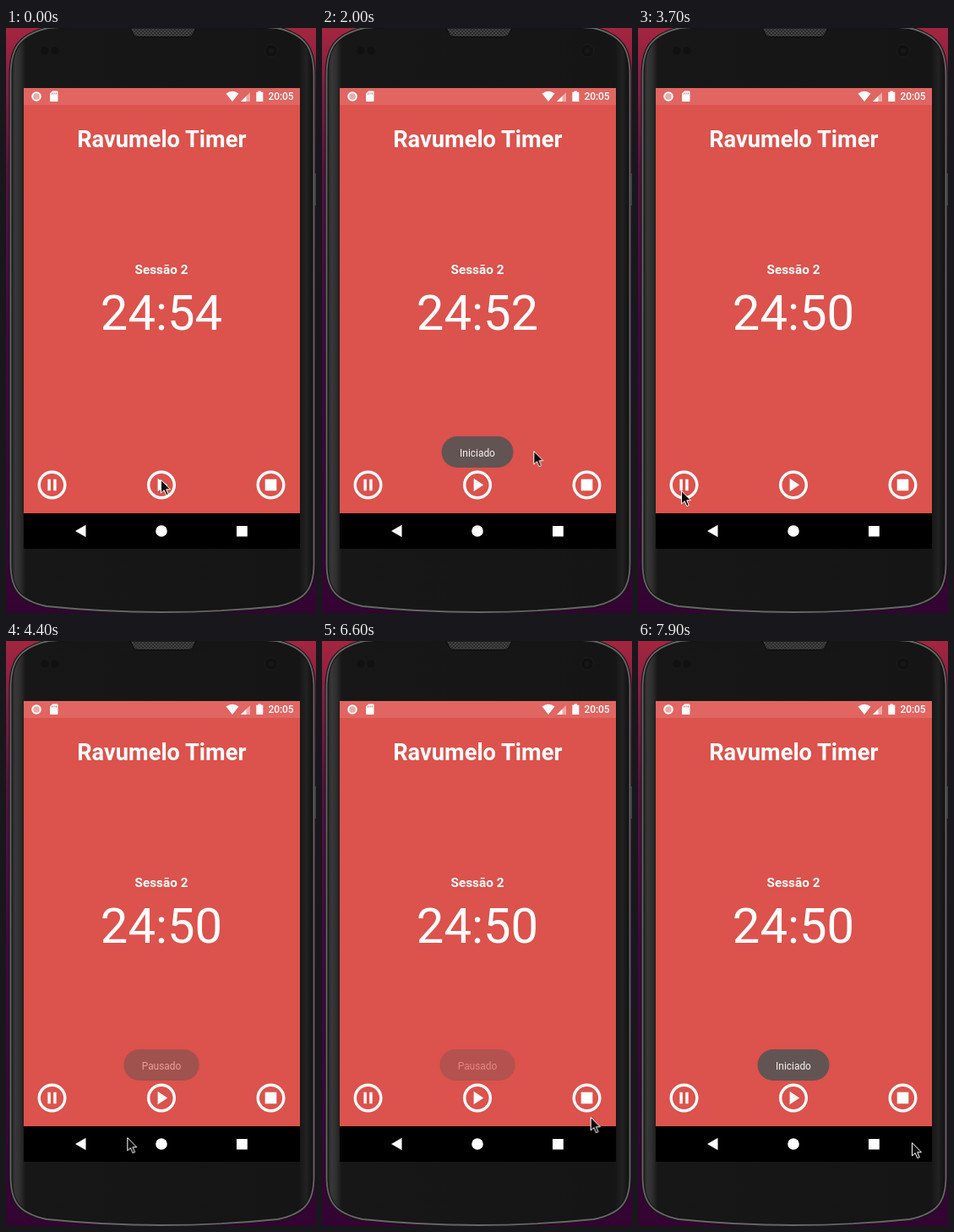
These frames come from a looping animation (367 by 692 pixels, 8 s). An HTML page:

```html
<!DOCTYPE html>
<html lang="pt">
<head>
<meta charset="utf-8">
<title>Ravumelo Timer</title>
<style>
  html, body { margin: 0; width: 100%; height: 100%; overflow: hidden; background: #16060f; }
  svg { display: block; width: 100%; height: 100%; }
  text { font-family: Roboto, sans-serif; fill: #fff; text-anchor: middle; }
  .title { font-size: 27.25px; font-weight: 700; }
  .session { font-size: 15.33px; font-weight: 700; }
  .count text { font-size: 58px; }
  .toast text { font-size: 11.92px; fill: #f2f2f2; }
  .clock { font-size: 11.92px; font-weight: 500; }

  .count, .toast, .cursor { animation: 8s linear infinite; }
  .count { animation-name: count; animation-timing-function: step-end; }
  .started { animation-name: started; }
  .paused { animation-name: paused; }
  .cursor { animation-name: roam; }

  /* one line of the strip per second */
  @keyframes count {
    0% { transform: translateY(0); }
    3.75% { transform: translateY(-80px); }
    16.25% { transform: translateY(-160px); }
    28.75% { transform: translateY(-240px); }
    41.25%, 100% { transform: translateY(-320px); }
  }
  @keyframes started {
    0%, 2.5% { opacity: 0; animation-timing-function: ease-out; }
    13.75%, 30% { opacity: 1; }
    41.25%, 87.5% { opacity: 0; animation-timing-function: ease-out; }
    98.75%, 100% { opacity: 1; }
  }
  @keyframes paused {
    0%, 51.25% { opacity: 0; animation-timing-function: ease-out; }
    62.5%, 75% { opacity: 1; }
    86.25%, 100% { opacity: 0; }
  }
  @keyframes roam {
    0%, 2.5% { transform: translate(183px, 534px); }
    6.25% { transform: translate(290px, 600px); }
    7.5% { transform: translate(304px, 606px); }
    10% { transform: translate(304px, 599px); }
    13.75%, 15% { transform: translate(304px, 597px); }
    16.25%, 22.5% { transform: translate(304px, 595px); }
    23.75% { transform: translate(288px, 565px); }
    27.5% { transform: translate(176px, 372px); }
    28.75%, 35% { transform: translate(162px, 351px); }
    41.25% { transform: translate(305px, 554px); }
    42.5% { transform: translate(285px, 553px); }
    46.25% { transform: translate(51px, 547px); }
    48.75%, 51.25% { transform: translate(50px, 546px); }
    57.5% { transform: translate(205px, 614px); }
    60% { transform: translate(237px, 634px); }
    62.5%, 63.75% { transform: translate(234px, 624px); }
    66.25%, 68.75% { transform: translate(234px, 617px); }
    71.25%, 75% { transform: translate(233px, 612px); }
    81.25%, 82.5% { transform: translate(318px, 563px); }
    87.5%, 88.75% { transform: translate(184px, 538px); }
    95% { transform: translate(322px, 592px); }
    97.5%, 100% { transform: translate(324px, 593px); }
  }
</style>
</head>
<body>
<svg viewBox="0 0 367 692">
  <defs>
    <linearGradient id="wall" x2="0" y2="1">
      <stop offset="0" stop-color="#a3263f"/>
      <stop offset=".1" stop-color="#831d43"/>
      <stop offset=".25" stop-color="#571040"/>
      <stop offset=".5" stop-color="#43083f"/>
      <stop offset="1" stop-color="#330432"/>
    </linearGradient>
    <linearGradient id="shell">
      <stop offset="0" stop-color="#1c1c1c"/>
      <stop offset=".015" stop-color="#383838"/>
      <stop offset=".03" stop-color="#303030"/>
      <stop offset=".05" stop-color="#171717"/>
      <stop offset=".95" stop-color="#151515"/>
      <stop offset=".975" stop-color="#222"/>
      <stop offset="1" stop-color="#0e0e0e"/>
    </linearGradient>
    <pattern id="mesh" width="4" height="4" patternUnits="userSpaceOnUse">
      <rect width="4" height="4" fill="#2b2b2b"/>
      <path d="M0 0L4 4M4 0L0 4" stroke="#484848" stroke-width=".8"/>
    </pattern>
    <clipPath id="slot"><rect x="90" y="304" width="190" height="66"/></clipPath>
    <path id="body" d="M5.500 56C5.500 26 14 8 50 0Q184 -10 321 0C356 8 364.500 26 364.500 56V634C364.500 664 354 677 322 684Q184 698 48 684C16 677 5.500 664 5.500 634Z"/>
    <circle id="ring" r="15.3" fill="none" stroke="#fff" stroke-width="3.4"/>
  </defs>

  <rect width="367" height="692" fill="url(#wall)"/>

  <!-- phone -->
  <use href="#body" fill="url(#shell)" stroke="#141414" stroke-width="4"/>
  <use href="#body" fill="none" stroke="#666" stroke-width="1.800"/>
  <path d="M365.500 172h1.500v38h-1.500z" fill="#444"/>
  <path d="M147 0H225L221 8Q219 10.500 215 10.500H157Q153 10.500 151 8Z" fill="url(#mesh)" stroke="#080808"/>
  <g fill="#111">
    <circle cx="314" cy="27" r="7.500" stroke="#1d1d1d"/>
    <circle cx="314" cy="27" r="3" fill="#18181c"/>
    <circle cx="46" cy="27" r="4.500"/>
    <circle cx="58" cy="27" r="4.500"/>
  </g>

  <!-- screen -->
  <rect x="21" y="71" width="327" height="503" fill="#dc524c"/>
  <rect x="21" y="71" width="327" height="20" fill="#e16561"/>
  <rect x="21" y="574" width="327" height="42"/>

  <!-- status bar -->
  <g fill="#fff">
    <circle cx="36" cy="81" r="4.800" fill="#efaaa6" stroke="#fff" stroke-width="2"/>
    <path d="M55 74.500H60.500Q61.500 74.500 61.500 75.500V86Q61.500 87 60.500 87H53Q52 87 52 86V77.500Z"/>
    <path d="M54.700 76.500v2M57 76.500v2M59.300 76.500v2" stroke="#e16561"/>
    <path d="M260.500 77.500Q268 72 275.500 77.500L268 87Z"/>
    <path d="M278 87L289 76V87Z" fill="#f0aaa7"/>
    <path d="M278 87L284.500 80.500V87Z"/>
    <path d="M298.500 74.500h3.500v1.300h2.300V87h-8V75.800h2.200z"/>
  </g>
  <text class="clock" x="325.500" y="85.300">20:05</text>

  <text class="title" x="184.300" y="140.500">Ravumelo Timer</text>
  <text class="session" x="184" y="291.200">Sessão 2</text>
  <g clip-path="url(#slot)">
    <g class="count">
      <text x="184" y="357">24:54</text>
      <text x="184" y="437">24:53</text>
      <text x="184" y="517">24:52</text>
      <text x="184" y="597">24:51</text>
      <text x="184" y="677">24:50</text>
    </g>
  </g>

  <!-- controls -->
  <g fill="#fff">
    <g transform="translate(54.500 540.500)">
      <use href="#ring"/><path d="M-5.100 -6.800h3.400v13.600h-3.400zM1.700 -6.800h3.400v13.600h-3.400z"/>
    </g>
    <g transform="translate(184 540.500)">
      <use href="#ring"/><path d="M-4.400 -7.650L7.200 0L-4.400 7.650Z"/>
    </g>
    <g transform="translate(313.500 540.500)">
      <use href="#ring"/><path d="M-6.800 -6.800h13.600v13.600h-13.600z"/>
    </g>
    <path d="M82 595L94.500 587.700V602.300Z"/>
    <circle cx="184" cy="595" r="6.800"/>
    <rect x="273" y="589" width="12.800" height="12.500"/>
  </g>

  <!-- toasts -->
  <g class="toast started">
    <rect x="141.500" y="483" width="85" height="37" rx="18.500" fill="#625453"/>
    <text x="184" y="506.600">Iniciado</text>
  </g>
  <g class="toast paused">
    <rect x="139.300" y="483" width="89.500" height="37" rx="18.500" fill="#625453"/>
    <text x="184" y="506.600">Pausado</text>
  </g>

  <g class="cursor">
    <path d="M.5 .5V16L4.200 12.700L6.800 18.700L9.300 17.600L6.800 11.800H11.500Z" fill="#0c0c0c" stroke="#fff"/>
  </g>
</svg>
</body>
</html>
```
